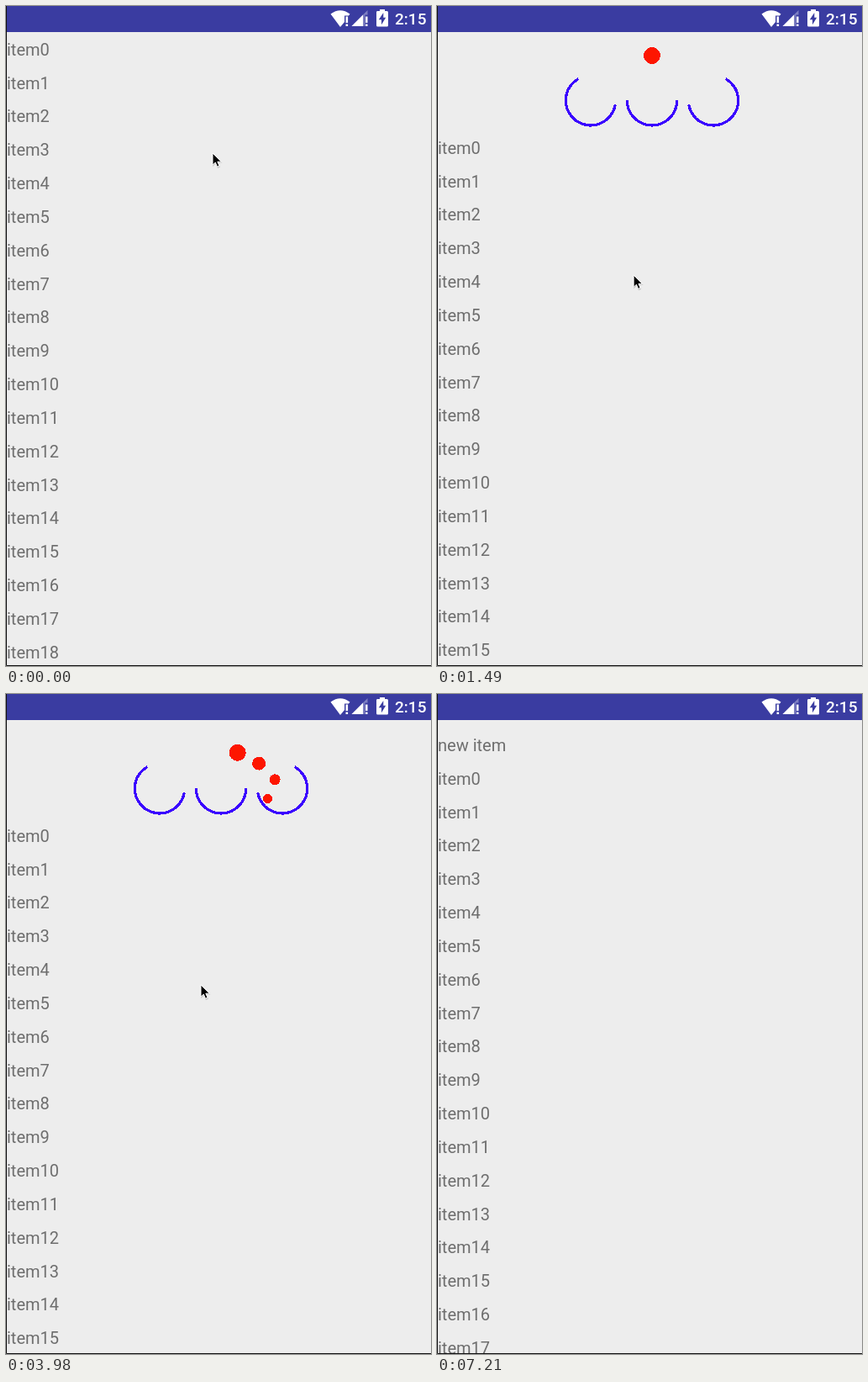
Recreate the animation shown at these times as an HTML page. Size 506 by 785 pixels, loop 7.31 s.

```html
<!DOCTYPE html>
<html lang="en">
<head>
<meta charset="utf-8">
<title>Pull to refresh</title>
<style>
  html, body { margin: 0; width: 100%; height: 100%; overflow: hidden; background: #ededed; }
  svg { display: block; width: 506px; height: 785px; }
  text { font-family: Roboto, sans-serif; }
  #list { font-size: 20px; fill: #6e6e6e; }
  #header { shape-rendering: crispEdges; }
  #arcs { fill: none; stroke: #3a00ff; stroke-width: 3.2; }
  #balls { fill: #fd1600; }
</style>
</head>
<body>
<svg viewBox="0 0 506 785">
  <rect width="506" height="785" fill="#ededed"/>
  <g id="header">
    <g id="arcs"></g>
    <g id="balls"></g>
  </g>
  <g id="list"></g>

  <g id="status" fill="#fff">
    <rect width="506" height="31" fill="#3a3ca1"/>
    <g transform="translate(-.5 -.5)">
      <path d="M387 10Q398.500 1.500 410 10L408.500 12H403.500V19.500L398.500 25.500Z"/>
      <path d="M405 13h2.600v7.500h-2.600zM405 22h2.600v2.600h-2.600z"/>
      <path d="M412 24.500L431 5.500V11H428V24.500Z" opacity=".35"/>
      <path d="M412 24.500L425.500 11V24.500Z"/>
      <path d="M428.600 13h2.400v7.500h-2.400zM428.600 22h2.400v2.600h-2.400z"/>
      <path d="M442.500 6.500H445.500V4.500H451.500V6.500H454Q455.500 6.500 455.500 8V23.500Q455.500 25 454 25H443Q441.500 25 441.500 23.500V8Q441.500 6.500 442.500 6.500Z"/>
      <path d="M449.800 8.500L444.300 16.800H447.500V22.800L452.700 14.300H449.800Z" fill="#3a3ca1"/>
    </g>
    <text x="463" y="22" font-size="19" font-weight="500">2:15</text>
  </g>
  <path d="M.5 0V784.500H506" fill="none" stroke="#111"/>

  <g id="cursor">
    <path d="M0 1V16L3.600 12.700L6 18L9 16.800L6.700 11.500H11.500Z" opacity=".16"/>
    <path d="M0 0V14.200L3.300 11.100L5.500 16.200L8 15.100L5.800 10.200H10.400Z" stroke="#fff" stroke-linejoin="round"/>
  </g>
</svg>
<script>
const LOOP = 7310, STEP = 147.6;
const ROW = 39.84, HEADER = 117, TOP_GAP = 49;
const DRAG_STEPS = 13.25, TOUCH_SLOP = 3, RESISTANCE = 0.83;
const SPIN_START = 2200, SPIN_TIME = 2936, LAG = 0.0255;
const MIDDLE = 256, SPACING = 73, BOWL_Y = 112.3;

const byId = id => document.getElementById(id);
const move = (el, x, y) => el.setAttribute('transform', `translate(${x} ${y})`);
const show = (el, on) => el.setAttribute('visibility', on ? 'visible' : 'hidden');
const clamp = (v, max = 1) => Math.min(max, Math.max(0, v));
const smooth = v => v * v * (3 - 2 * v);
const lerp = (a, b, f) => a + (b - a) * f;

function make(name, attrs, parent) {
  const el = document.createElementNS('http://www.w3.org/2000/svg', name);
  for (const key in attrs) el.setAttribute(key, attrs[key]);
  if (parent) parent.append(el);
  return el;
}

function polar(cx, cy, r, deg) {
  const a = deg * Math.PI / 180;
  return [cx + r * Math.cos(a), cy + r * Math.sin(a)];
}

function arc(cx, from, to) {
  const r = 29.7, large = to - from > 180 ? 1 : 0;
  const [start, end] = [from, to].map(deg => polar(cx, BOWL_Y, r, deg));
  make('path', { d: `M${start}A${r} ${r} 0 ${large} 1 ${end}` }, byId('arcs'));
}
arc(MIDDLE - SPACING, 10, 240);
arc(MIDDLE, 0, 180);
arc(MIDDLE + SPACING, -60, 170);

// Smooth curve through all points (Catmull-Rom)
function curve(points) {
  let d = `M${points[0]}`;
  for (let i = 0; i + 1 < points.length; i++) {
    const p = points[i], q = points[i + 1];
    const before = points[i - 1] || p, after = points[i + 2] || q;
    const c1 = p.map((v, n) => v + (q[n] - before[n]) / 6);
    const c2 = q.map((v, n) => v - (after[n] - p[n]) / 6);
    d += `C${c1} ${c2} ${q}`;
  }
  return make('path', { d });
}

// One roll through a bowl; direction 1 is clockwise
function roll(cx, direction) {
  const points = [];
  for (let deg = -60; deg <= 240; deg += 60) {
    const [x, y] = polar(0, BOWL_Y + 1.5, 21, deg);
    points.push([cx + direction * x, y]);
  }
  return points;
}

const home = [MIDDLE, 59];
const track = curve([
  home, ...roll(MIDDLE, 1),
  [275, 65], ...roll(MIDDLE + SPACING, 1),
  [MIDDLE, 66], ...roll(MIDDLE - SPACING, -1),
  [237, 77], home
]);
const trackLength = track.getTotalLength();
const balls = [10, 8, 6.5, 5.5].map(r => make('circle', { r }, byId('balls')));

const rows = Array.from({ length: 20 }, (_, i) => {
  const row = make('text', { x: 1 }, byId('list'));
  row.textContent = i ? 'item' + (i - 1) : 'new item';
  return row;
});

function placeRows(offset) {
  rows.forEach((row, i) => row.setAttribute('y', Math.floor(59.2 + offset + (i - 1) * ROW)));
}

function placeBalls(time) {
  balls.forEach((ball, i) => {
    const u = clamp((time - SPIN_START) / SPIN_TIME - i * LAG);
    const p = track.getPointAtLength(trackLength * (1 - Math.cos(Math.PI * u)) / 2);
    move(ball, p.x, p.y);
  });
}

function draw(t) {
  const step = Math.floor(t / (t < 1930 ? 148.5 : STEP));
  const inserted = step >= 37, closed = step >= 38;

  const pull = smooth(clamp(step / DRAG_STEPS));
  const leave = Math.max(0, (step - 40) / 4) ** 1.6;
  const dragY = 171 * pull;
  const offset = clamp((dragY - TOUCH_SLOP) * RESISTANCE, HEADER);

  move(byId('cursor'), lerp(246, 232, pull) + 193 * leave, 175 + dragY + 346 * leave);
  show(byId('cursor'), leave <= 1);

  placeRows(closed ? TOP_GAP : offset);
  show(rows[0], inserted);
  move(byId('header'), 0, offset - HEADER - (inserted ? ROW : 0));
  show(byId('header'), !closed);
  placeBalls(step * STEP);
}

const begin = performance.now();
function tick() {
  draw((performance.now() - begin) % LOOP);
  requestAnimationFrame(tick);
}
tick();
</script>
</body>
</html>
```
